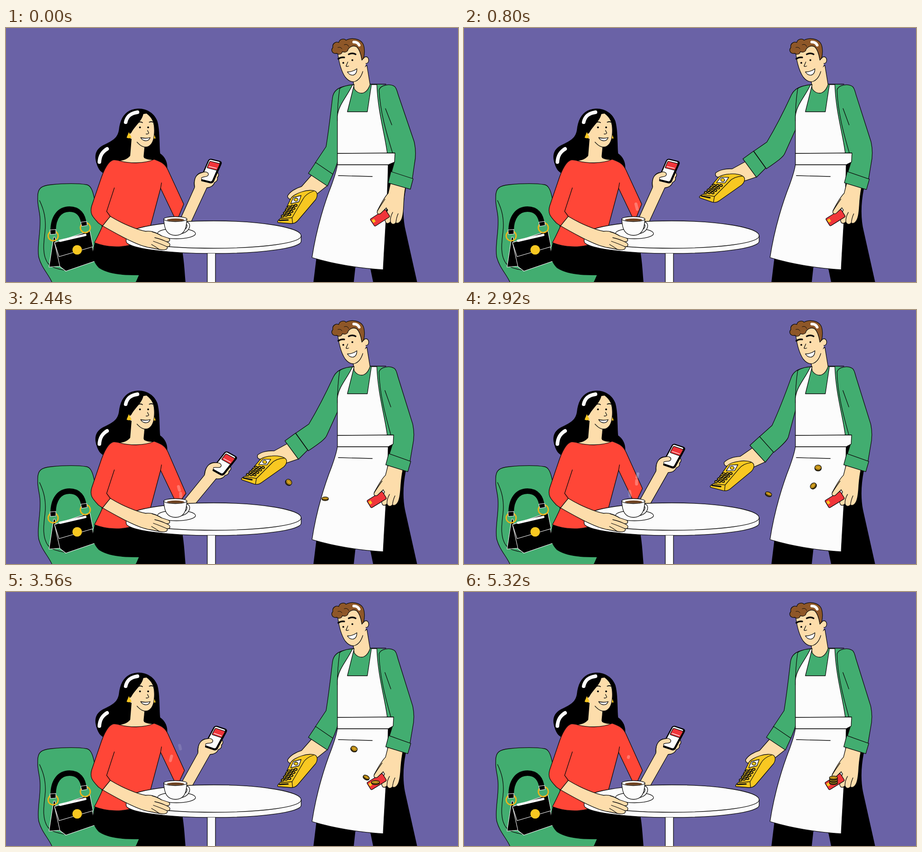
These frames come from a looping animation (997x561 px, 5360 ms). An HTML page:

```html
<!DOCTYPE html>
<html lang="en">
<head>
<meta charset="utf-8">
<title>Paying at the table</title>
<style>
html, body { margin: 0; width: 100%; height: 100%; overflow: hidden; background: #6a62a6; }
svg { display: block; width: 997px; height: 561px; }
svg * { stroke-linejoin: round; stroke-linecap: round; }
.o { stroke: #0c0c0c; stroke-width: 1.3; }
.l { fill: none; stroke: #0c0c0c; stroke-width: 1.3; }
.w { fill: #fcfcfc; }
.s { fill: #fdddab; }
.g { fill: #42ad70; }
.r { fill: #ff4637; }
.y { fill: #f8c821; }
.shine { fill: none; stroke: #fcfcfc; stroke-width: 8; }
.seam { fill: #000; stroke: #fcfcfc; stroke-width: 1.1; }
.ring { fill: none; stroke: #e9b51c; stroke-width: 3; }
</style>
</head>
<body>
<svg viewBox="0 0 997 561">
  <!-- chair -->
  <path class="g o" d="M70 375C69 352 80 348 100 346C130 343 160 343 178 346C188 348 192 362 195 378L215 450L300 545L285 563H102C95 545 78 530 72 505C68 480 77 450 75 420C74 402 69 392 70 375Z"/>
  <path class="l" d="M74 381C84 402 89 422 86 450C82 480 81 503 92 519C103 533 122 532 132 536"/>

  <!-- handbag -->
  <path class="seam" d="M105 462L95 528L120 526L108 462Z"/>
  <path class="seam" d="M107 474L185 448L196 515L132 537L119 527Z"/>
  <path class="seam" d="M107 474L185 448L192 483L117 505Z"/>
  <path d="M119 470L175 457" class="shine" style="stroke-width:5"/>
  <path d="M104 448C104 418 118 400 140 400C160 400 170 413 172 434" fill="none" stroke="#000" stroke-width="12" style="stroke-linecap:butt"/>
  <circle class="ring" cx="104" cy="459" r="11"/>
  <circle class="ring" cx="175" cy="441" r="11"/>
  <path class="seam" d="M97 446L110 445V455L98 456ZM165 429L178 427L179 436L167 438Z"/>
  <circle class="y" cx="157" cy="490" r="10.500"/>

  <!-- woman -->
  <path d="M290 178C311 177 328 189 334 206C340 228 338 258 340 277C352 285 358 300 355 314L340 335L230 325L216 321C208 318 203 310 200 300C194 283 197 268 214 259C232 250 246 245 249 225C252 198 264 180 290 178Z"/>
  <path class="shine" d="M264 208C267 194 276 188 290 186"/>
  <path class="shine" d="M206 296C207 281 213 273 223 267"/>
  <path class="s" d="M303 190C299 207 285 215 276 232C270 234 270 243 277 245L274 282C268 290 258 293 246 294L285 304L327 291C316 292 306 289 304 286L306 263C318 263 326 252 327 234C329 214 324 199 310 189Z"/>
  <path class="l" d="M289 252C296 260 301 263 307 263C319 263 326 252 327 234C328 222 327 214 325 207M306 263L304 284"/>
  <circle cx="295.500" cy="219.500" r="2"/><circle cx="313.500" cy="219.500" r="2"/>
  <path class="l" d="M291 209Q297 206 301 209M316 208Q321 206 324 208" style="stroke-width:1.800"/>
  <path class="l" d="M312 226L315 232Q313 235 309 234"/>
  <path class="w o" d="M297 242Q308 245 318 242Q315 250 307 249Q300 248 297 242Z"/>
  <path class="y" d="M271 230L266 242Q271 245 277 242ZM327.500 236L326 244H330Z"/>

  <path d="M196 473C189 500 189 513 205 530C228 545 260 546 293 546L286 562H396C394 540 393 515 389 494L272 478Z"/>

  <!-- raised arm, phone -->
  <g id="reach">
    <path class="s o" d="M372 450L416 352C413 338 418 324 428 320L440 318L465 318C470 321 470 327 466 330C468 335 465 339 460 341C458 348 451 352 443 353L402 442Z"/>
    <g transform="matrix(.97 .24 -.4 .92 452 316)">
      <rect x="-15.500" y="-27" width="31" height="54" rx="6"/>
      <rect class="w" x="-13" y="-24.500" width="24" height="47" rx="3.500"/>
      <g id="chip"><rect class="o" x="-11" y="-21" width="23" height="16" rx="2" fill="#f0353a"/>
      <path d="M-8 -9H9" stroke="#fff" stroke-width="1.300"/></g>
    </g>
    <path class="s" d="M417 344C414 330 422 321 434 319C442 316 448 320 446 325C443 330 437 327 431 331L430 344Z"/>
    <path class="l" d="M416 350C413 330 422 321 434 319C442 316 448 320 446 325C443 330 437 327 431 331"/>
  </g>
  <path class="r o" id="top"/>
  <path class="l" d="M239 353L222 405L230 416M341 354L343 342"/>

  <!-- table -->
  <path class="w o" d="M265 459C265 441 351 426 458 426S651 441 651 459V471C651 486 565 498 458 498S265 486 265 471Z"/>
  <path class="l" d="M265 459C265 475 351 486.500 458 486.500S651 475 651 459"/>
  <path class="w o" d="M444 498V562H462V498"/>
  <ellipse class="w o" cx="376" cy="454" rx="42" ry="11.500"/>
  <g id="steam"></g>
  <path class="l" d="M394 432C405 427 407 446 388 451" style="stroke-width:7"/>
  <path d="M394 432C405 427 407 446 388 451" fill="none" stroke="#fcfcfc" stroke-width="4.400"/>
  <path class="w o" d="M348 422C349 445 355 458 374 458C392 458 398 445 399 422Z"/>
  <ellipse class="w o" cx="373.500" cy="422" rx="25.500" ry="5.500"/>
  <ellipse cx="374" cy="423.800" rx="19" ry="3" fill="#6d4221"/>
  <path class="s o" d="M230 416C256 432 290 446 308 449C322 447 333 453 343 459L358 464C364 467 361 473 354 472C365 476 363 484 355 483C359 490 348 491 338 489L317 485C295 482 262 465 213 437Z"/>
  <path class="l" d="M328 463Q342 466 354 472M325 471Q342 477 355 483M321 478Q330 483 338 489M322 450Q334 453 343 459"/>

  <!-- waiter -->
  <path d="M838 296H858L870 340L882 355C875 390 875 422 882 450L907 562H810L803 528L771 525L767 562H678L685 505L760 330Z"/>
  <path class="g o" id="sleeve"/>
  <path class="g" d="M767 124C752 126 740 131 736 135C732 160 730 180 731 205V280H856L850 140C843 124 825 124 803 124Z"/>
  <path class="l" d="M767 125C752 126 740 130 736 134C732 160 731 180 731 205M803 124H838"/>
  <path class="s o" d="M766 118L768 134C774 144 785 146 791 142C798 138 801 131 803 125L796 82L776 100Z"/>
  <g transform="translate(-1 0)">
    <ellipse class="s o" cx="795" cy="71" rx="6" ry="7.500"/>
    <path class="s" d="M733 57C736 80 741 96 749 108C756 117 764 120 771 118C783 112 790 95 795 80L788 64L780 38L742 40Z"/>
    <path class="l" d="M733 57C736 80 741 96 749 108C756 117 764 120 771 118C779 115 785 106 788 96"/>
    <path class="o" fill="#8e5728" d="M731 56C722 58 716 50 722 43C720 35 728 29 735 32C737 23 748 23 751 27C764 20 782 24 788 34C793 43 792 58 790 66L786 71C784 58 781 48 775 42C766 36 759 43 756 46C755 53 748 55 743 52C742 58 735 60 731 56Z"/>
    <path class="l" d="M733 43Q739 41 742 46M747 37Q754 34 757 41" style="stroke-width:1"/>
    <path class="shine" d="M768 31C774 31 778 33 780 38" style="stroke-width:6"/>
    <path class="l" d="M734 68Q740 64 747 65M757 58Q765 54 772 58" style="stroke-width:3.600"/>
    <circle cx="745" cy="77" r="2"/><circle cx="765" cy="71" r="2"/>
    <path class="l" d="M755 75L751 84Q753 86 757 84"/>
    <path class="w o" d="M754 97Q766 97 775 90Q775 102 767 104Q759 105 754 97Z"/>
  </g>

  <path class="w o" d="M764 126L768 125L753 185H797L806 125H818C820 185 836 235 841 277H731V195C733 170 752 152 764 126Z"/>
  <path class="w o" d="M731 302H843C842 380 835 470 832 534C780 531 720 521 675 507C685 440 705 380 718 347C726 325 729 315 731 302Z"/>
  <path class="l" d="M733 326L808 328"/>

  <!-- hanging arm, card -->
  <g id="hang">
    <path class="s o" d="M848 343L843 365C834 374 826 390 819 404L828 415L838 397L842 402C836 412 834 424 838 430C842 434 846 430 848 428C850 434 856 435 860 430C866 434 872 426 874 418C879 400 875 385 881 352Z"/>
    <path class="l" d="M848 428Q847 418 853 407M860 430Q861 419 865 410"/>
    <rect class="o" x="-20" y="-9.500" width="40" height="19" rx="2.500" fill="#f0353a" transform="translate(825 419.500) rotate(-33)"/>
    <rect class="y" x="-3" y="-3.500" width="6" height="7" transform="translate(811 426) rotate(-33)"/>
    <path class="s" d="M836 378C828 390 822 399 819 405C817 411 824 413 828 408L839 397Z"/>
    <path class="l" d="M836 378C828 390 822 399 819 405C817 411 824 413 828 408L839 397"/>
    <path class="g o" d="M823 137C826 126 846 122 857 129C862 133 863 142 866 150L900 250C904 266 904 285 901 300L896 335L850 320L857 295L853 277C840 235 825 185 823 137Z"/>
    <path class="l" d="M837 178L851 214"/>
    <path class="g o" d="M849 317L898 333L892 356L843 342Z"/>
  </g>
  <path class="w o" id="belt"/>

  <g id="note">
    <path class="o" d="M-7 -17H11V15H-7Z" fill="#2f8a58"/>
    <path class="w o" d="M-10 -15H7V17H-10Z"/>
    <path d="M-1 -10V-3" stroke="#222" stroke-width="2.500"/>
    <path d="M-8 13A7 7 0 0 1 6 13Z" fill="#999" class="o"/>
  </g>
  <g id="strip" transform="translate(488 329) rotate(28)">
    <rect class="o" x="-12" y="-5" width="24" height="10" rx="1.500" fill="#f0353a"/>
    <path d="M-8 0H8" stroke="#fff" stroke-width="2" stroke-dasharray="2 2" style="stroke-linecap:butt"/>
  </g>
  <g id="rays" stroke="#fcfcfc" stroke-width="2.600"></g>
  <g id="coins"></g>

  <!-- arm with terminal -->
  <path class="s o" id="hand" d="M674 325L652 350C638 354 626 362 621 371C622 379 629 380 634 374L646 372L684 368L709 348Z"/>
  <g id="terminal">
    <path class="y o" d="M599 428C600 423 606 421 609 417L628 377C631 371 642 365 652 362C664 358 677 357 683 361C688 365 687 373 683 379L644 425C640 430 634 432 629 432L603 430C600 430 599 429 599 428Z"/>
    <path class="l" d="M607 421L631 419L655 378Q661 366 679 360M631 419L632 431"/>
    <path d="M603 425L622 424" stroke="#111" stroke-width="3.200"/>
    <path class="w o" d="M634 374L651 370L646 384L628 388Z"/>
    <ellipse class="y o" cx="639.500" cy="379" rx="4.500" ry="3.500"/>
    <g id="keys"></g>
  </g>
  <path class="g o" id="cuff" d="M683 297L721 323L709 349L667 321Z"/>
</svg>
<script>
const LOOP = 5360, STEP = 40;
const $ = id => document.getElementById(id);
const clamp = x => Math.max(0, Math.min(1, x));
const span = (t, from, to) => clamp((t - from) / (to - from));
const inOut = x => x < .5 ? 4 * x ** 3 : 1 - 4 * (1 - x) ** 3;
const out = x => 1 - (1 - x) ** 2;
const lerp = (a, b, p) => a + (b - a) * p;
const set = (id, name, value) => $(id).setAttribute(name, value);
const show = (id, on) => { $(id).style.display = on ? '' : 'none'; };

// Blend two path strings of the same structure.
function mix(a, b, p) {
  const to = b.match(/-?[\d.]+/g);
  let i = 0;
  return a.replace(/-?[\d.]+/g, n => lerp(+n, +to[i++], p).toFixed(2));
}

// Carry a point (x, y) by (dx, dy) while turning around it.
const swing = (x, y, dx, dy, deg, p) =>
  `translate(${x + dx * p} ${y + dy * p}) rotate(${deg * p}) translate(${-x} ${-y})`;

const topPath = tip => `M238 291C224 293 214 318 207 340L189 393C184 410 191 417 204 431L213 437C205 455 200 465 195 474C225 486 255 484 272 480L318 440L341 354L372 419${tip}L357 313C350 298 340 295 327 290C305 300 270 300 246 292Z`;
const TOP = [topPath('L381 416L392 389'), topPath('L387 419L397 405')];
const SLEEVE = [
  'M752 128C735 130 722 137 720 155C716 190 712 225 706 262L682 298L721 323C727 310 731 297 733 290L735 200Z',
  'M752 128C735 130 727 138 722 148C705 185 690 215 668 252L639 272L667 311C690 295 705 285 708 276L731 225Z'
];
const BELT = ['M731 277L858 276L857 296L843 302L731 302Z', 'M731 277L855 276L854 296L843 302L731 302Z'];

let keys = '';
for (let row = 0; row < 4; row++)
  for (let col = -1; col < 2; col++)
    keys += `<ellipse class="y" cx="${631.5 - 4.6 * row + 7.6 * col}" cy="${393.5 + 6.7 * row - 1.7 * col}" rx="2.900" ry="2.200" stroke="#111" stroke-width="2"/>`;
$('keys').innerHTML = keys;

// x, time at mid height, half length
const PUFFS = [[381, 810, 6], [365, 1480, 6], [382, 2440, 4], [383, 2690, 4], [364, 3111, 5], [362, 4820, 1]];
function steam(t) {
  return PUFFS.map(([x, mid, half]) => {
    const y = 394 - .059 * (t - mid);
    if (y > 422 || y < 338) return '';
    const at = v => (x + 2.5 * Math.sin(v / 9)).toFixed(1) + ' ' + v.toFixed(1);
    const fade = .28 * clamp((y - 338) / 10);
    return `<path d="M${at(y - half)}L${at(y)}L${at(y + half)}" fill="none" stroke="#fff" stroke-width="6.500" opacity="${fade}"/>`;
  }).join('');
}

const RAYS = [-91, -50, -6, 36, 73, 113, 150, 188, 228];
function rays(t) {
  const q = (t - 1360) / 400;
  if (q <= 0 || q >= 1) return '';
  const r0 = 35 + 46 * q ** 1.2, r1 = 35 + 46 * out(q);
  return RAYS.map(deg => {
    const c = Math.cos(deg * Math.PI / 180), s = Math.sin(deg * Math.PI / 180);
    return `<path d="M${486 + r0 * c} ${327 + r0 * s}L${486 + r1 * c} ${327 + r1 * s}"/>`;
  }).join('');
}

// time, x, y along the coins' shared route
const ROUTE = [[2080, 590, 356], [2160, 624, 380], [2360, 672, 406], [2440, 704, 416], [2640, 770, 388],
  [2780, 785, 367], [2920, 781, 348], [3000, 768, 346], [3120, 763, 373], [3280, 795, 409], [3400, 815, 413]];
function onRoute(t) {
  const last = ROUTE.length - 1;
  let i = 0;
  while (i < last - 1 && t > ROUTE[i + 1][0]) i++;
  const at = k => ROUTE[Math.max(0, Math.min(last, k))];
  const a = at(i), b = at(i + 1), h = b[0] - a[0], u = clamp((t - a[0]) / h);
  const slope = (k, n) => {
    const p = at(k - 1), q = at(k + 1);
    return (q[n] - p[n]) / (q[0] - p[0]) * h;
  };
  return [1, 2].map(n => {
    const m0 = slope(i, n), m1 = slope(i + 1, n);
    return a[n] + m0 * u + (3 * (b[n] - a[n]) - 2 * m0 - m1) * u * u + (2 * (a[n] - b[n]) + m0 + m1) * u ** 3;
  });
}
function coin(t, k) {
  const own = t - 280 * k;
  if (own < 2080) return '';
  let [x, y] = onRoute(own);
  const land = span(own, 3280, 3400);
  y += land * (7 - 5 * k);
  const spin = (own - 2440) / 150;
  const rx = lerp(7.2, 9, land);
  const ry = lerp(3.2 + 2.6 * Math.abs(Math.sin(spin * .6)), 3.6, land);
  const tilt = lerp(-45 * Math.sin(spin), 0, land);
  return `<g transform="translate(${x} ${y}) rotate(${tilt})">
    <ellipse class="o" cy="2" rx="${rx}" ry="${ry}" fill="#8a6412"/>
    <ellipse class="o" rx="${rx}" ry="${ry}" fill="#d9a51f"/>
    <ellipse rx="${rx * .6}" ry="${ry * .55}" fill="none" stroke="#8a6412"/></g>`;
}

function draw(t) {
  // terminal arm
  const arm = inOut(span(t, 0, 760)) - inOut(span(t, 2540, 3440));
  const forearm = swing(683, 297, -44.5, -25, 20, arm);
  set('sleeve', 'd', mix(...SLEEVE, arm));
  set('hand', 'transform', forearm);
  set('cuff', 'transform', forearm);
  set('terminal', 'transform', swing(643, 395, -73, -43, 14.5, arm));

  // hanging arm
  const sway = out(span(t, 0, 1600));
  set('hang', 'transform', `rotate(${1.45 * sway} 845 130)`);
  set('belt', 'd', mix(...BELT, sway));

  // phone arm
  const turn = 14.8 * inOut(span(t, 820, 1260)) - 10 * inOut(span(t, 2440, 3000));
  set('reach', 'transform', `rotate(${turn} 378 442)`);
  set('top', 'd', mix(...TOP, turn / 14.8));

  // banknote: slides out of the phone, then arcs into the terminal
  const rise = inOut(span(t, 1280, 1480)), fly = inOut(span(t, 1600, 2080));
  const paying = t >= 1280 && t < 2080, striped = t >= 1280 && t < 1800;
  const x = lerp(lerp(488, 495, rise), 548, fly);
  const y = lerp(lerp(330, 313, rise), 350, fly) - 160 * fly * (1 - fly);
  const size = lerp(.4, 1, rise) * lerp(1, .5, fly);
  show('note', paying);
  set('note', 'transform', `translate(${x} ${y}) rotate(${22 + 70 * fly}) scale(${size})`);
  show('strip', striped);
  show('chip', !striped);

  $('rays').innerHTML = rays(t);
  $('steam').innerHTML = steam(t);
  $('coins').innerHTML = [0, 1, 2].map(k => coin(t, k)).join('');
}

const start = performance.now();
function tick() {
  const t = (performance.now() - start) % LOOP;
  draw(Math.floor(t / STEP) * STEP);
  requestAnimationFrame(tick);
}
tick();
</script>
</body>
</html>
```
